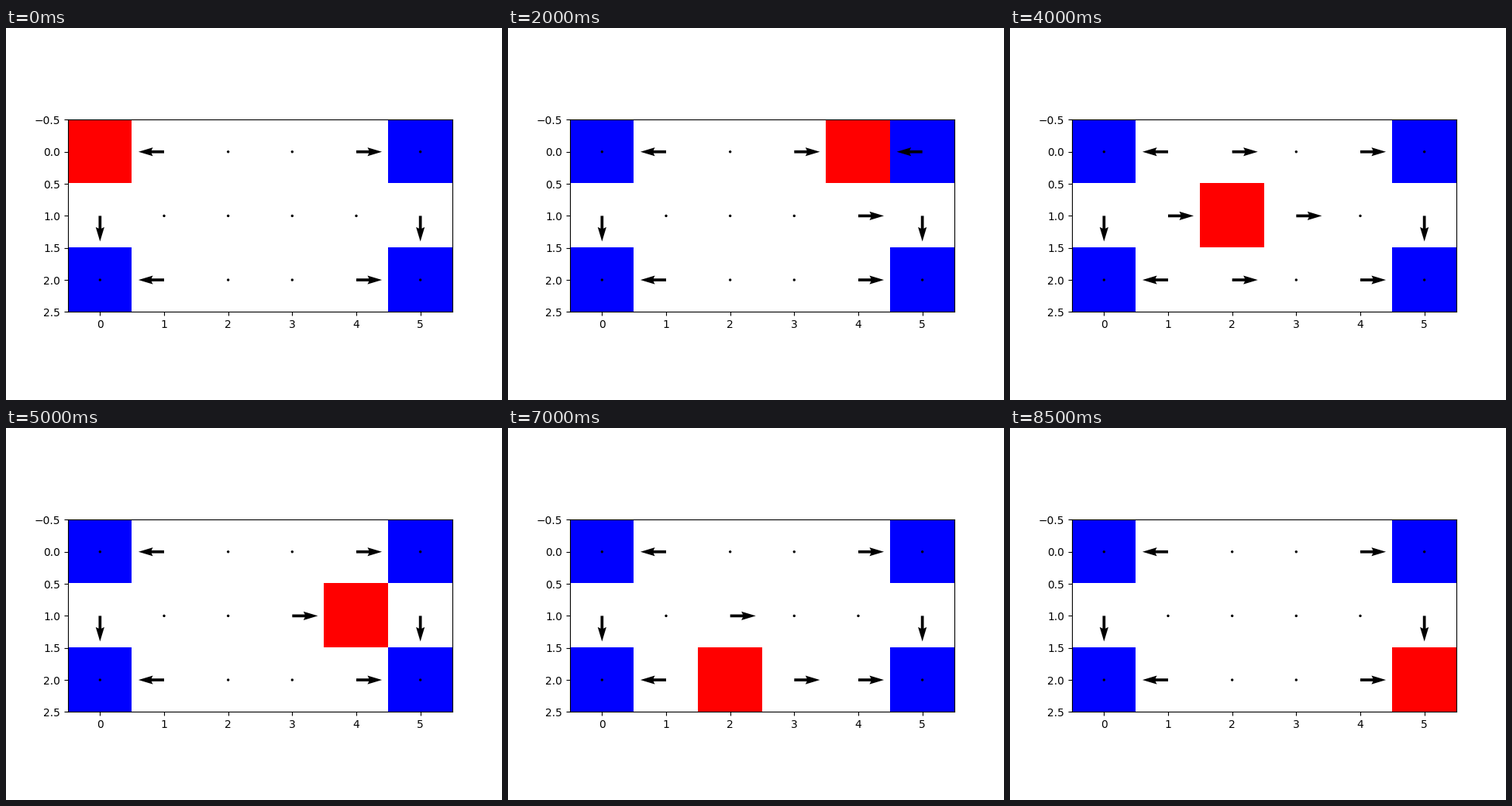
A matplotlib script that plays this animation: 640 by 480 pixels, repeating every 9 s.

```python
import matplotlib.pyplot as plt
import numpy as np
from matplotlib.animation import ArtistAnimation

ROWS, COLS = 3, 6
CORNERS = {(r, c) for r in (0, ROWS - 1) for c in (0, COLS - 1)}
CELLS = [(r, c) for r in range(ROWS) for c in range(COLS)]
# (row step, column step); earlier moves win ties
MOVES = [(0, 0), (0, 1), (0, -1), (1, 0), (-1, 0)]
WHITE, BLUE, RED = (255, 255, 255), (0, 0, 255), (255, 0, 0)


def reward(cell, rival):
    """Corners are worth visiting, cells right beside the rival are not."""
    distance = abs(cell[0] - rival[0]) + abs(cell[1] - rival[1])
    return (cell in CORNERS) - 2 * (distance == 1)


def best_move(cell, rival):
    options = [(dr, dc) for dr, dc in MOVES
               if 0 <= cell[0] + dr < ROWS and 0 <= cell[1] + dc < COLS]
    return max(options, key=lambda m: reward((cell[0] + m[0], cell[1] + m[1]), rival))


def board(rival):
    img = np.full((ROWS, COLS, 3), WHITE, dtype=np.uint8)
    for cell in CORNERS:
        img[cell] = BLUE
    img[rival] = RED
    return img


def draw_state(ax, rival):
    image = ax.imshow(board(rival))
    others = [cell for cell in CELLS if cell != rival]
    y, x = np.array(others).T
    dy, dx = np.array([best_move(cell, rival) for cell in others]).T
    arrows = ax.quiver(x, y, dx, -dy, scale=15)
    return [image, arrows]


fig, ax = plt.subplots(figsize=(6.4, 4.8), dpi=100)
states = [draw_state(ax, rival) for rival in CELLS]
ax.set_xlim(-0.5, COLS - 0.5)
ax.set_ylim(ROWS - 0.5, -0.5)

anim = ArtistAnimation(fig, states, interval=500, repeat=True, repeat_delay=0)
plt.show()
```
